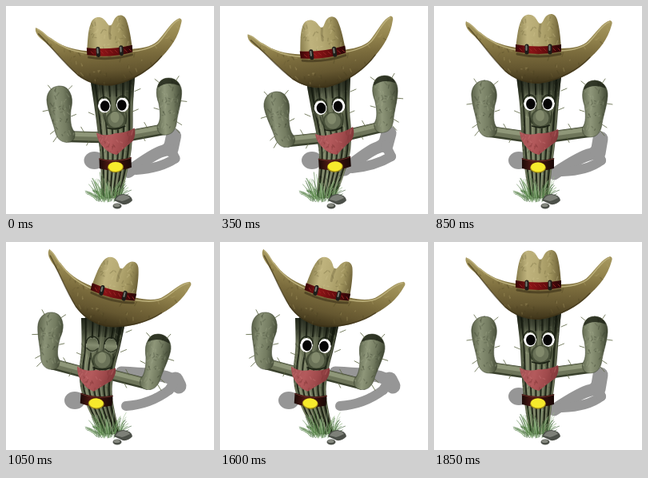
These frames come from a looping animation (260 px wide and 260 px high, 1.95 s). An HTML page with a canvas:

```html
<!DOCTYPE html>
<html>
<head>
<meta charset="utf-8">
<title>Swaying cactus</title>
<style>
html, body { margin: 0; width: 100%; height: 100%; overflow: hidden; background: #fff; }
canvas { display: block; }
</style>
</head>
<body>
<canvas id="stage" width="260" height="260"></canvas>
<script>
const ctx = document.getElementById('stage').getContext('2d');

// Every part is [x, y, degrees]; s0 to s7 are shadow points.
const center = {
  hat: [131, 52, 0], top: [131, 88, 0], face: [131.5, 122, 0],
  left: [63, 110, 0], right: [201, 110, 0],
  scarf: [131, 160, 0], belt: [130, 198, 0], base: [131, 240, 0],
  s0: [106, 193, 0], s1: [150, 210, 0], s2: [185, 187, 0], s3: [205, 184, 0], s4: [208, 166, 0],
  s5: [160, 207, 0], s6: [192, 206, 0], s7: [209, 193, 0]
};
const right = {
  hat: [129, 57, -7], top: [135, 89, 0], face: [137, 126, -6],
  left: [71, 124, -9], right: [206, 104, -3],
  scarf: [143, 160, -7], belt: [143.5, 197, -4], base: [132, 240, 0],
  s0: [115, 193, 0], s1: [156, 205, 0], s2: [187, 180, 0], s3: [207, 174, 0], s4: [211, 159, 0],
  s5: [165, 203, 0], s6: [194, 200, 0], s7: [214, 188, 0]
};
const left = {
  hat: [135, 62, 13.5], top: [122, 95, 0], face: [119.5, 129.5, 3],
  left: [56, 105, 6], right: [190, 132, 9],
  scarf: [112.5, 161, 6], belt: [113, 198, 4], base: [131, 240, 0],
  s0: [86, 198, 0], s1: [144, 163, 0], s2: [188, 165, 0], s3: [212, 172, 0], s4: [216, 180, 0],
  s5: [150, 205, 0], s6: [180, 203, 0], s7: [204, 185, 0]
};
function between(a, b) {
  const pose = {};
  for (const k in a) pose[k] = a[k].map((v, i) => (v + b[k][i]) / 2);
  return pose;
}
const halfRight = between(center, right), halfLeft = between(center, left);

// [start ms, pose, how far the lids are down]
const LOOP = 1950;
const steps = [
  [0, halfRight, 0], [100, right, 1], [200, right, 0.5], [350, right, 0], [500, right, 0.5],
  [650, right, 0], [750, halfRight, 0], [850, center, 0], [950, halfLeft, 0],
  [1050, left, 1], [1150, left, 0.5], [1300, left, 0], [1450, left, 0.5], [1600, left, 0],
  [1750, halfLeft, 0], [1850, center, 0]
];

function random(seed) {
  return () => (seed = (seed * 16807) % 2147483647) / 2147483647;
}
function gradient(x0, y0, x1, y1, colors) {
  const g = ctx.createLinearGradient(x0, y0, x1, y1);
  colors.forEach((c, i) => g.addColorStop(i / (colors.length - 1), c));
  return g;
}
function fill(d, color) {
  ctx.fillStyle = color;
  ctx.fill(new Path2D(d));
}
function stroke(d, color, width = 1) {
  ctx.strokeStyle = color;
  ctx.lineWidth = width;
  ctx.stroke(new Path2D(d));
}
function ellipse(x, y, rx, ry, color) {
  ctx.beginPath();
  ctx.ellipse(x, y, rx, ry, 0, 0, 7);
  ctx.fillStyle = color;
  ctx.fill();
}
function line(x0, y0, x1, y1, color, width) {
  stroke(`M${x0} ${y0}L${x1} ${y1}`, color, width);
}
function at([x, y, deg], draw, flip = 1) {
  ctx.save();
  ctx.translate(x, y);
  ctx.rotate(deg * Math.PI / 180);
  ctx.scale(flip, 1);
  draw();
  ctx.restore();
}
// Smooth string through the midpoints of a list of points
function smooth(pts, start = 'M') {
  let d = start + pts[0];
  for (let i = 1; i < pts.length - 1; i++) {
    const [x, y] = pts[i], [u, v] = pts[i + 1];
    const end = i === pts.length - 2 ? [u, v] : [(x + u) / 2, (y + v) / 2];
    d += `Q${x} ${y} ${end}`;
  }
  return d;
}
function mottle(d, seed, [x, y, w, h], count, colors) {
  const r = random(seed);
  ctx.save();
  ctx.clip(new Path2D(d));
  for (let i = 0; i < count; i++) {
    const px = x + r() * w, py = y + r() * h;
    line(px, py, px + r() * 6 - 3, py + r() * 5, colors[i % colors.length], 1.4);
  }
  ctx.restore();
}

function drawShadow(p) {
  const xy = k => p[k].slice(0, 2);
  const gray = '#969696';
  ellipse(...xy('s0'), 13, 11, gray);
  stroke(smooth(['s1', 's2', 's3', 's4'].map(xy)), gray, 15);
  stroke(smooth(['s5', 's6', 's7'].map(xy)), gray, 12);
  line(...xy('s3'), ...xy('s4'), gray, 19);
  line(...xy('s7'), ...xy('s3'), gray, 12);
}

function drawArm(p, side) {
  const part = side < 0 ? p.left : p.right;
  const a = part[2] * Math.PI / 180, c = Math.cos(a), s = Math.sin(a);
  const ex = -side * 7, ey = 46;
  const x = part[0] + ex * c - ey * s, y = part[1] + ex * s + ey * c;
  const sx = p.scarf[0] + side * 19;
  const sy = p.scarf[1] + 3 + side * 19 * Math.sin(p.scarf[2] * Math.PI / 180);
  line(x, y + 1, sx, sy, '#3a412d', 14);
  line(x, y, sx, sy - 1, '#6e755a', 11);
  line(x, y - 2, sx, sy - 3, '#8f9779', 5);
  at(part, () => {
    const d = 'M0-17C-10-17-17-8-16 3C-15 16-11 25-9 37C-8 47-3 54 6 54C14 54 17 47 15 41C11 36 11 26 13 14C15 8 16 3 15-3C13-12 9-17 0-17Z';
    const tones = side < 0 ? ['#5c634b', '#899175', '#747c61', '#454c38'] : ['#3d4431', '#727a5f', '#8f977a', '#626a51'];
    fill(d, gradient(-16, 0, 16, 0, tones));
    mottle(d, 77, [-16, -17, 34, 71], 80, ['#a9b09244', '#333a2855', '#565e4666']);
    if (side > 0) fill('M0-17C-7-17-12-13-14-7Q2-14 14-5C13-12 9-17 0-17Z', '#1b2014cc');
    stroke(d, '#39402c88', 1);
    for (const [tx, ty, dx, dy] of [[-9, -13, -4, -6], [-15, 12, -7, 1], [11, -11, 6, -5], [-9, 38, -6, 4], [13, 22, 6, -2], [-7, 46, -5, 6]])
      line(tx, ty, tx + dx, ty + dy, '#5c6542', 0.8);
  }, -side);
  const mx = (x + sx) / 2, my = (y + sy) / 2;
  line(mx, my - 5, mx - 4, my - 12, '#5c6542', 0.8);
  line(mx - side * 6, my + 5, mx - side * 3, my + 11, '#5c6542', 0.8);
}

function drawBody(p) {
  const spine = [p.top, p.face, p.scarf, p.belt, p.base];
  const widths = [28, 24, 22, 18, 12];
  const edge = k => spine.map(([x, y], i) => [x + k * widths[i], y]);
  const d = smooth(edge(-1)) + smooth(edge(1).reverse(), 'L') + 'Z';
  const [x] = p.scarf;
  fill(d, gradient(x - 27, 0, x + 30, 0, ['#3b422f', '#7c8467', '#6c7459', '#565e46', '#23281a']));
  mottle(d, 31, [x - 32, 88, 68, 150], 130, ['#a3aa8a55', '#2a301f77', '#4a523b88']);
  for (let k = -0.8; k < 0.9; k += 0.32) {
    stroke(smooth(edge(k)), '#12170ccc', 2);
    stroke(smooth(edge(k + 0.13)), '#a8ae8d77', 1.2);
  }
  ctx.save();
  ctx.clip(new Path2D(d));
  const [tx, ty] = p.top;
  ctx.fillStyle = gradient(0, ty, 0, ty + 32, ['#10140ccc', '#10140c88', '#10140c00']);
  ctx.fillRect(tx - 40, ty - 5, 80, 37);
  ctx.restore();
  for (const [i, k, dy] of [[0, 1, 18], [1, 1, 8], [1, -1, 12]]) {
    const [px, py] = edge(k)[i];
    line(px, py + dy, px + k * 7, py + dy - 3, '#5c6542', 0.8);
  }
}

function drawFace(p, lid) {
  at(p.face, () => {
    ellipse(0, 5, 19, 16, '#666e5488');
    ellipse(2, 19, 13, 12, '#474f39');
    ellipse(2, 18, 10, 10, '#6a7258');
    ellipse(1, 15, 5.5, 7, '#828a6c');
    stroke('M-9 28Q2 32 13 27', '#1b2114', 1.5);
    stroke('M-13 11Q-12 19-9 24M15 10Q16 18 14 24', '#262d1caa', 1.5);
    for (const x of [-11.5, 11.5]) {
      const eye = new Path2D();
      eye.ellipse(x, 0, 8, 9, 0, 0, 7);
      ctx.save();
      ctx.clip(eye);
      ellipse(x, 0, 8, 9, '#fff');
      ellipse(x * 0.92, 0.5, 5.8, 6.8, '#050505');
      ctx.fillStyle = gradient(0, -9, 0, 9, ['#555d45', '#858d70', '#5f674d']);
      ctx.fillRect(x - 9, -9, 18, 18 * lid);
      ctx.restore();
      stroke(`M${x - 8}-2A8 9 0 0 1 ${x + 8}-2`, '#1d2316', 1.3);
      if (lid === 1) stroke(`M${x - 7} 4Q${x} 11 ${x + 7} 4`, '#333a28', 1.3);
    }
  });
}

function drawClothes(p) {
  at(p.scarf, () => {
    const d = 'M-24-3Q-13 3 0-1Q13 0 24-6Q26 2 21 10Q11 17 0 26Q-9 24-15 17Q-23 9-24-3Z';
    fill(d, gradient(-20, 0, 24, 12, ['#a65355', '#b45a5c', '#a04a4c', '#7c3436']));
    mottle(d, 12, [-24, -6, 48, 34], 55, ['#cc787855', '#7a303055']);
  });
  at(p.belt, () => {
    fill('M-20-8Q0-2 20-8L20 5Q0 11-20 5Z', gradient(-20, 0, 20, 0, ['#1c0a07', '#521a15', '#35100c', '#180806']));
    stroke('M-20-7Q0-1 20-7', '#6b3029', 1);
    ellipse(0, 4, 10, 6.8, '#a08a18');
    ellipse(0, 3.5, 9, 5.9, '#f6ea2c');
  });
}

function drawHat(p) {
  at(p.hat, () => {
    const brim = 'M-91-33C-84-29-80-22-73-19C-62-9-48-3-28 0L27 1C44 1 56-2 62-9C72-19 79-31 89-34Q93-33 91-28C86-10 76 2 64 13C50 28 26 42 0 45C-20 45-32 38-42 30C-60 10-70-4-80-14Q-94-25-91-33Z';
    fill(brim, gradient(0, -32, 0, 45, ['#a6985f', '#95864f', '#7b6c3d', '#655730', '#3c3218']));
    mottle(brim, 51, [-92, -32, 184, 77], 190, ['#b3a56c44', '#42381b44', '#6b5e3455']);
    stroke('M-89-31C-82-28-79-21-72-17C-60-7-48-1-28 3M88-32C79-29 73-17 63-7C56 0 44 3 28 4', '#b9ad78', 1.6);
    stroke('M-88-25C-70-5-60 12-42 29C-32 38-20 44 0 44C26 41 50 27 64 12', '#3a301699', 1.6);
    stroke('M-27 8Q0 14 27 8', '#3a301699', 3);

    const crown = 'M-29 1C-27-14-26-26-22-34C-19-42-11-43-6-39C-2-36-1-30 2-30C5-30 6-37 10-40C15-44 21-42 23-35C26-25 27-13 28 1Q0 8-29 1Z';
    fill(crown, gradient(-29, 0, 29, 0, ['#857a4a', '#bfb37d', '#b5a973', '#a1955f', '#62562f']));
    mottle(crown, 19, [-29, -42, 58, 44], 55, ['#d5ca9744', '#71683c55']);
    stroke('M2-29Q0-22 1-14', '#7c724677', 3);

    fill('M-29-4Q0 1 28-4L28 5Q0 11-29 5Z', gradient(-29, 0, 28, 0, ['#3a0607', '#8b1416', '#650c0e', '#260506']));
    for (let x = -24; x < 25; x += 6) line(x, 1, x + 3, 4, '#a02a2a', 0.8);
    for (const x of [-15, 14]) {
      line(x, -2, x, 6, '#1d1d19', 5);
      line(x - 0.5, -2, x - 0.5, 3, '#777a72', 2);
    }
  });
}

function drawGround() {
  const r = random(99), greens = ['#4c7a3d', '#7fa86e', '#9dbd90', '#35592c'];
  for (let i = 0; i < 110; i++) {
    const x = 112 + r() * 32, y = 238 + r() * 7, lean = (x - 128) / 14 + r() - 0.6;
    const h = 6 + r() * r() * 30;
    stroke(`M${x} ${y}Q${x + lean * 3} ${y - h * 0.7} ${x + lean * 9} ${y - h}`, greens[i % 4], 0.6);
  }
  fill('M135 243Q138 235 147 235Q157 236 158 243Q153 249 146 248Z', '#4c5049');
  fill('M137 242Q140 236 147 236Q154 237 155 240Q149 243 145 244Z', '#7d8078');
  ellipse(139, 250, 5.5, 3.5, '#4c5049');
  ellipse(138.5, 249, 4, 2, '#85887f');
}

function draw(p, lid) {
  ctx.fillStyle = '#fff';
  ctx.fillRect(0, 0, 260, 260);
  ctx.lineCap = ctx.lineJoin = 'round';
  drawShadow(p);
  drawArm(p, -1);
  drawArm(p, 1);
  drawBody(p);
  drawFace(p, lid);
  drawClothes(p);
  drawHat(p);
  drawGround();
}

function frame() {
  const t = performance.now() % LOOP;
  const [, pose, lid] = steps.filter(s => s[0] <= t).pop();
  draw(pose, lid);
  requestAnimationFrame(frame);
}
frame();
</script>
</body>
</html>
```
